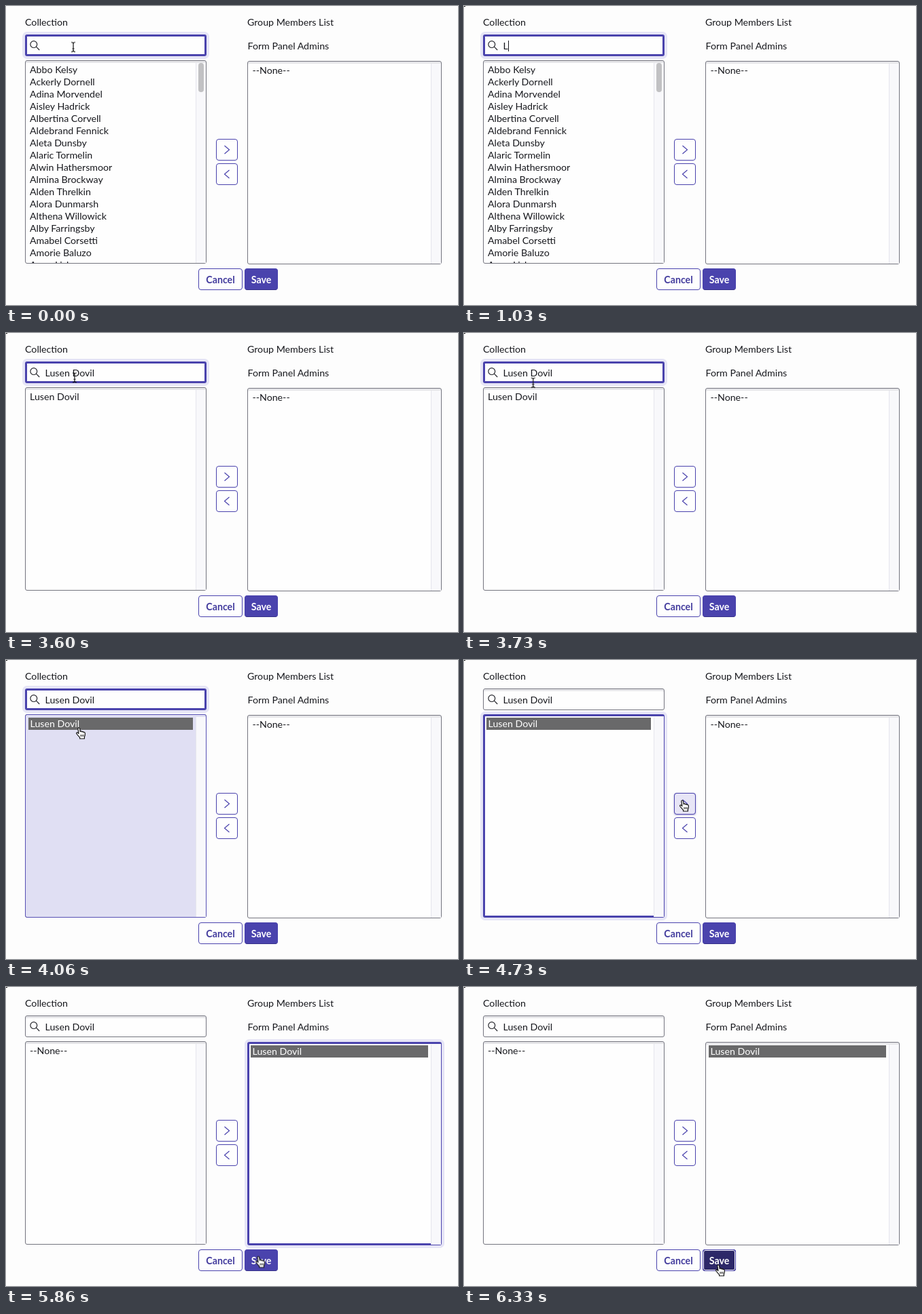
Recreate the animation shown at these times as an HTML page. Size 665x441 px, loop 6.8 s.

```html
<!DOCTYPE html>
<html lang="en">
<head>
<meta charset="utf-8">
<title>Group members</title>
<style>
  html, body { margin: 0; width: 100%; height: 100%; overflow: hidden; background: #fdfdfd; }
  body {
    position: relative;
    font: 14.2px/18px Lato, sans-serif;
    color: #17181d;
    --indigo: #4a43ad;
    --ring: #e6e5f6;
  }
  body * { position: absolute; box-sizing: border-box; margin: 0; white-space: pre; }
  path, circle { position: static; }

  .panel, .search { border: 1px solid #74757f; border-radius: 3px; background: #fefefe; box-shadow: inset 0 3px #e6e6e9; }
  .search { left: 28px; top: 42px; width: 267px; height: 32px; }
  .left { left: 28px; top: 80px; width: 267px; height: 300px; }
  .right { left: 355px; top: 81px; width: 286px; height: 300px; }
  .focus { border: 3px solid var(--indigo); border-radius: 3px; box-shadow: 0 0 0 4px var(--ring); background: #fefefe; }
  .panel.focus { border-right-width: 1px; }
  .pressed { border: 1px solid #5750b4; border-radius: 3px; background: #e0dff3; }
  .track { width: 15px; height: 295px; background: #f8f8fb; border-left: 1px solid #e5e5ed; }
  .thumb { left: 283px; top: 84px; width: 8px; height: 43px; border-radius: 4px; background: #c1c1c3; }
  .rows { left: 35px; top: 85px; width: 240px; height: 294px; overflow: hidden; }
  .picked { height: 18px; padding-left: 2.5px; background: #69696a; color: #fff; }

  .button { border: 1px solid var(--indigo); border-radius: 4px; background: #fefefe; color: #443d9e; }
  .arrow { left: 309px; width: 32px; height: 32px; }
  .arrow svg { left: 0; top: 0; }
  .label { top: 387px; height: 32px; line-height: 31px; font-weight: 700; text-align: center; }
  .save { left: 351px; width: 49px; background: var(--indigo); color: #fff; border-bottom-color: #37318a; }
  .save.hot { background: #2d2868; }
  .save.down { background: #2d2868; border-color: #4b44a9; box-shadow: inset 0 0 0 1px #fff; }
  svg { fill: none; overflow: visible; }

  .typed { left: 57.5px; top: 51px; line-height: 16px; }
  .typed::before {
    content: "";
    display: inline-block;
    height: 16px;
    border-right: 1px solid transparent;
    animation: type 6.8s step-end infinite, caret 6.8s step-end infinite;
  }
  .timed { animation: 6.8s step-end infinite; }
  .dot { left: 0; top: 0; width: 2px; height: 1px; background: #000; animation-name: dot; }
  .till-filter { animation-name: till-filter; }
  .found { animation-name: found; }
  .chosen { animation-name: chosen; }
  .till-move { animation-name: till-move; }
  .moved { animation-name: moved; }
  .search-focus { animation-name: search-focus; }
  .left-focus { animation-name: left-focus; }
  .right-focus { animation-name: right-focus; }
  .pressed { animation: press 6.8s linear infinite; }
  .hover { background: #e7e5f6; box-shadow: 0 1px 3px #bdb9df; animation-name: hover; }
  .hot { animation-name: save-hover; }
  .down { animation-name: save-down; }
  .beam { left: 0; top: 0; animation: beam-path 6.8s ease-in infinite, beam-show 6.8s step-end infinite; }
  .hand { left: 0; top: 0; animation: hand-path 6.8s ease-in-out infinite, hand-show 6.8s step-end infinite; }

  @keyframes type {
    0% { content: ""; }
    14.41% { content: "L"; }
    17.65% { content: "Lu"; }
    20.59% { content: "Lus"; }
    23.53% { content: "Luse"; }
    26.47% { content: "Lusen"; }
    28.38% { content: "Lusen "; }
    31.32% { content: "Lusen D"; }
    33.24% { content: "Lusen Do"; }
    35.29% { content: "Lusen Dov"; }
    37.21% { content: "Lusen Dovi"; }
    39.12%, 100% { content: "Lusen Dovil"; }
  }
  @keyframes caret {
    0% { border-color: transparent; }
    9.26% { border-color: #17181d; }
    45%, 100% { border-color: transparent; }
  }
  @keyframes dot { 0% { visibility: hidden; } .44%, 100% { visibility: visible; } }
  @keyframes till-filter { 0% { visibility: visible; } 46.03%, 100% { visibility: hidden; } }
  @keyframes found { 0% { visibility: hidden; } 46.03% { visibility: visible; } 58.6%, 100% { visibility: hidden; } }
  @keyframes chosen { 0% { visibility: hidden; } 58.6% { visibility: visible; } 73.5%, 100% { visibility: hidden; } }
  @keyframes till-move { 0% { visibility: visible; } 73.5%, 100% { visibility: hidden; } }
  @keyframes moved { 0% { visibility: hidden; } 73.5%, 100% { visibility: visible; } }
  @keyframes search-focus { 0% { visibility: visible; } 60.7%, 100% { visibility: hidden; } }
  @keyframes left-focus { 0% { visibility: hidden; } 60.7% { visibility: visible; } 73.5%, 100% { visibility: hidden; } }
  @keyframes right-focus { 0% { visibility: hidden; } 73.5% { visibility: visible; } 88.9%, 100% { visibility: hidden; } }
  @keyframes press { 0%, 58.2% { opacity: 0; } 59.2%, 60.7% { opacity: 1; } 62.5%, 100% { opacity: 0; } }
  @keyframes hover { 0% { visibility: hidden; } 67.6% { visibility: visible; } 79%, 100% { visibility: hidden; } }
  @keyframes save-hover { 0% { visibility: hidden; } 86.8%, 100% { visibility: visible; } }
  @keyframes save-down { 0% { visibility: hidden; } 88.9%, 100% { visibility: visible; } }
  @keyframes beam-show { 0% { visibility: visible; } 14.4% { visibility: hidden; } 48%, 100% { visibility: visible; } 55.1%, 100% { visibility: hidden; } }
  @keyframes beam-path {
    0%, 51% { transform: translate(99px, 60.5px); }
    53%, 53.8% { transform: translate(101px, 66px); }
    55.1%, 100% { transform: translate(102px, 76px); }
  }
  @keyframes hand-show { 0% { visibility: hidden; } 55.1%, 100% { visibility: visible; } }
  @keyframes hand-path {
    0%, 55.1% { transform: translate(98px, 80px); }
    58.2%, 61.8% { transform: translate(102px, 99px); }
    69%, 70.6% { transform: translate(316px, 206px); }
    75%, 77.4% { transform: translate(320px, 212px); }
    88%, 92% { transform: translate(369px, 408px); }
    93%, 100% { transform: translate(369px, 409px); }
  }
</style>
</head>
<body>
  <i class="dot timed"></i>

  <p style="left:28px;top:15px">Collection</p>
  <p style="left:355px;top:15px">Group Members List</p>
  <p style="left:355.5px;top:50px">Form Panel Admins</p>

  <div class="search"></div>
  <div class="search focus search-focus timed"></div>
  <svg width="60" height="80" style="left:0;top:0" stroke="#25262c" stroke-width="1.2">
    <circle cx="40.8" cy="56.6" r="4.9"/><path d="M44.4 60.2 49.2 65"/>
  </svg>
  <p class="typed"></p>

  <div class="panel left"></div>
  <div class="panel left focus left-focus timed"></div>
  <div class="left pressed"></div>
  <i class="track" style="left:279px;top:84px"></i>
  <i class="thumb till-filter timed"></i>
  <p class="rows till-filter timed">Abbo Kelsy
Ackerly Dornell
Adina Morvendel
Aisley Hadrick
Albertina Corvell
Aldebrand Fennick
Aleta Dunsby
Alaric Tormelin
Alwin Hathersmoor
Almina Brockway
Alden Threlkin
Alora Dunmarsh
Althena Willowick
Alby Farringsby
Amabel Corsetti
Amorie Baluzo
Anno Liskan</p>
  <p class="rows found timed">Lusen Dovil</p>
  <p class="picked chosen timed" style="left:33px;top:85px;width:242px">Lusen Dovil</p>
  <p class="rows moved timed">--None--</p>

  <div class="panel right"></div>
  <div class="panel right focus right-focus timed"></div>
  <i class="track" style="left:625px;top:85px"></i>
  <p class="till-move timed" style="left:362.5px;top:86px">--None--</p>
  <p class="picked moved timed" style="left:360px;top:86px;width:261px">Lusen Dovil</p>

  <div class="button arrow" style="top:196px"></div>
  <div class="button arrow hover timed" style="top:196px"></div>
  <div class="button arrow" style="top:232px"></div>
  <svg width="1" height="1" style="left:0;top:0" stroke="#4a43ad" stroke-width="1.2">
    <path d="M321.5 206 328.5 212 321.5 218M328.5 242 321.5 248 328.5 254"/>
  </svg>

  <div class="button label" style="left:283px;width:65px">Cancel</div>
  <div class="button label save">Save</div>
  <div class="button label save hot timed">Save</div>
  <div class="button label save down timed">Save</div>

  <svg class="beam" width="1" height="1" stroke="#111" stroke-width="1.2">
    <path d="M-3-7Q0-7 0-5 0-7 3-7M0-5V5M-3 7Q0 7 0 5 0 7 3 7M-1.5 2.5H1.5"/>
  </svg>
  <svg class="hand" width="16" height="18" stroke="#111" stroke-width="1.2" stroke-linejoin="round">
    <path fill="#fff" d="M3.9 2.6C3.7.6 6.3.4 6.6 2.4L7.2 6.6C7.6 5.6 9.3 5.7 9.6 7 10.2 6.2 11.6 6.5 11.9 7.6 12.8 7 14.1 7.6 14.3 9 14.7 11.5 14.3 12.6 13.4 14.4V17H6.6V15.3C5 13.6 3.4 11.8 2 10 .8 8.4 2.6 7.2 4 8.6L4.9 9.5Z"/>
    <path stroke-width=".9" d="M8 11v3M10 11v3M12 11v3"/>
  </svg>
</body>
</html>
```
